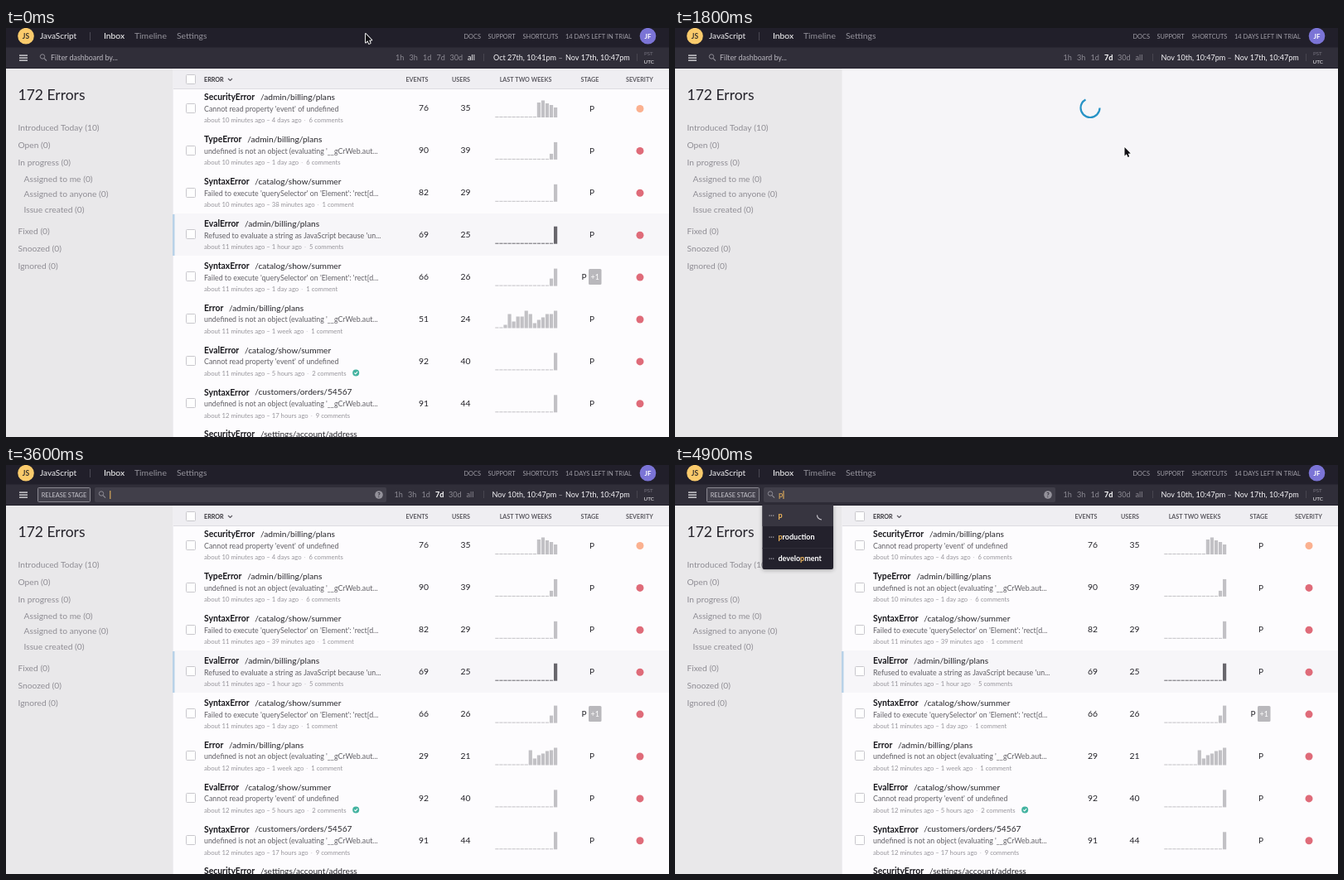
An HTML page with a canvas that plays this animation: 800 px wide and 494 px high, repeating every 5000 ms.

```html
<!DOCTYPE html>
<html lang="en">
<head>
<meta charset="utf-8">
<title>Error inbox</title>
<style>
html, body { margin: 0; width: 100%; height: 100%; overflow: hidden; background: #f6f5f8; }
canvas { display: block; width: 800px; height: 494px; }
</style>
</head>
<body>
<canvas id="stage"></canvas>
<script>
const W = 800, H = 494, LOOP = 5000, STEP = 100;
const FONT = 'Lato, "Open Sans", sans-serif';
const AMBER = '#f2b95c', PANEL = '#23212c', WHITE = '#ffffff';
const ROW_H = 50.9;

const canvas = document.getElementById('stage');
const ctx = canvas.getContext('2d');
const dpr = window.devicePixelRatio || 1;
canvas.width = W * dpr;
canvas.height = H * dpr;

const T = {
  hover: 800, click: 1100, loaded: 1900,
  focus: 2500, r: 2600, re: 2700, rel: 2800,
  pill: 3600, options: 3700, p: 4100, busy: 4500
};

const UNDEF = "undefined is not an object (evaluating '__gCrWeb.aut...";
const EVENT = "Cannot read property 'event' of undefined";
const QUERY = "Failed to execute 'querySelector' on 'Element': 'rect[d...";
const REFUSED = "Refused to evaluate a string as JavaScript because 'un...";

// Minutes hold [before, after] the range change; bars align to the right edge.
const ROWS = [
  { name: 'SecurityError', path: '/admin/billing/plans', msg: EVENT, mins: [10, 10], ago: '4 days', notes: '6 comments', n: [76, 35], bars: [18, 20.5, 17, 15, 12], mild: true },
  { name: 'TypeError', path: '/admin/billing/plans', msg: UNDEF, mins: [10, 10], ago: '1 day', notes: '6 comments', n: [90, 39], bars: [7, 21] },
  { name: 'SyntaxError', path: '/catalog/show/summer', msg: QUERY, mins: [10, 11], ago: '38 minutes', later: '39 minutes', notes: '1 comment', n: [82, 29], bars: [21] },
  { name: 'EvalError', path: '/admin/billing/plans', msg: REFUSED, mins: [11, 11], ago: '1 hour', notes: '5 comments', n: [69, 25], bars: [21], active: true },
  { name: 'SyntaxError', path: '/catalog/show/summer', msg: QUERY, mins: [11, 11], ago: '1 day', notes: '1 comment', n: [66, 26], bars: [9, 21], extra: true },
  { name: 'Error', path: '/admin/billing/plans', msg: UNDEF, mins: [11, 12], ago: '1 week', notes: '1 comment', n: [51, 24], n2: [29, 21],
    bars: [4, 17, 8, 14, 14, 21, 17, 6, 10, 13, 17, 17, 21], bars2: [18, 8, 12, 14, 17, 18, 21] },
  { name: 'EvalError', path: '/catalog/show/summer', msg: EVENT, mins: [11, 12], ago: '5 hours', notes: '2 comments', n: [92, 40], bars: [21], done: true },
  { name: 'SyntaxError', path: '/customers/orders/54567', msg: UNDEF, mins: [12, 12], ago: '17 hours', notes: '9 comments', n: [91, 44], bars: [21] },
  { name: 'SecurityError', path: '/settings/account/address', msg: EVENT, mins: [12, 12], ago: '2 days', notes: '3 comments', n: [64, 31], bars: [21] }
];

const FILTERS = [
  ['user id', 'user impacted by an event'],
  ['user email', 'user impacted by an event'],
  ['user name', 'user impacted by an event'],
  ['release stage', 'production, staging, development, etc.'],
  ['introduced in version', 'app version the error was first seen in'],
  ['seen in version', 'app version the event occurred in'],
  ['introduced in version code', 'version code the error was first seen in'],
  ['seen in version code', 'version code the event occurred in']
];

function box(x, y, w, h, fill) {
  ctx.fillStyle = fill;
  ctx.fillRect(x, y, w, h);
}

function round(x, y, w, h, r, fill, stroke) {
  ctx.beginPath();
  ctx.roundRect(x, y, w, h, r);
  if (fill) { ctx.fillStyle = fill; ctx.fill(); }
  if (stroke) { ctx.strokeStyle = stroke; ctx.lineWidth = 1; ctx.stroke(); }
}

function disc(x, y, r, fill) {
  ctx.beginPath();
  ctx.arc(x, y, r, 0, Math.PI * 2);
  ctx.fillStyle = fill;
  ctx.fill();
}

function line(points, color, width = 1) {
  ctx.beginPath();
  points.forEach(([x, y]) => ctx.lineTo(x, y));
  ctx.strokeStyle = color;
  ctx.lineWidth = width;
  ctx.stroke();
}

function arc(x, y, r, from, to, color, width) {
  ctx.beginPath();
  ctx.arc(x, y, r, from, to);
  ctx.strokeStyle = color;
  ctx.lineWidth = width;
  ctx.stroke();
}

// y is the middle of the capitals; returns the right edge.
function text(s, x, y, size, color, bold = false, align = 'left') {
  ctx.font = (bold ? '700 ' : '400 ') + size + 'px ' + FONT;
  ctx.textAlign = align;
  ctx.fillStyle = color;
  ctx.fillText(s, x, y + size * 0.36);
  return x + ctx.measureText(s).width;
}

// Title with one highlighted part.
function marked(s, part, x, y) {
  const i = part ? s.indexOf(part) : -1;
  if (i < 0) return text(s, x, y, 9, WHITE, true);
  x = text(s.slice(0, i), x, y, 9, WHITE, true);
  x = text(part, x, y, 9, AMBER, true);
  return text(s.slice(i + part.length), x, y, 9, WHITE, true);
}

function topBar() {
  box(0, 0, W, 23, '#211f2a');
  disc(24, 9.7, 9.8, '#fbcb6c');
  text('JS', 24, 10, 8.6, '#3a332c', true, 'center');
  text('JavaScript', 41, 9.5, 10, '#f2f1f4');
  box(101, 5, 1, 10, '#4b4954');
  text('Inbox', 118, 9.5, 10.3, WHITE);
  text('Timeline', 155, 9.5, 10.4, '#94929b');
  text('Settings', 206, 9.5, 10.4, '#94929b');
  text('DOCS', 552.5, 10.5, 7.4, '#a09ea7');
  text('SUPPORT', 581.5, 10.5, 7.4, '#a09ea7');
  text('SHORTCUTS', 623.5, 10.5, 7.4, '#a09ea7');
  text('14 DAYS LEFT IN TRIAL', 675, 10.5, 7.5, '#a09ea7');
  disc(774.5, 9.7, 9.8, '#7b74d6');
  text('JF', 774.5, 10, 8, WHITE, true, 'center');
}

function magnifier(x) {
  arc(x - 1, 34.5, 2.7, 0, Math.PI * 2, '#8d8b94', 1);
  line([[x + 1, 36.7], [x + 4, 39.7]], '#8d8b94', 1.2);
}

function filterBar(t) {
  box(0, 23, W, 26, '#302e39');
  box(0, 23, W, 1, '#282631');
  box(0, 48, W, 1, '#24222d');
  for (const y of [32.5, 35.5, 38.5]) box(16, y, 10, 1.2, '#f4f3f6');

  const picked = t >= T.click;
  const dx = picked ? -1.5 : 0;
  const ranges = [['1h', 470], ['3h', 486.5], ['1d', 503], ['7d', 519.5], ['30d', 535.5], ['all', 557]];
  for (const [label, x] of ranges) {
    const lit = label === '7d' ? t >= T.hover : label === 'all' && !picked;
    text(label, x + dx, 35.5, 9.1, lit ? WHITE : '#8c8a93', lit && label === '7d');
  }
  box(576, 31, 1, 9, '#47454f');
  text(picked ? 'Nov 10th, 10:47pm' : 'Oct 27th, 10:41pm', picked ? 586.5 : 588, 35.5, 9.05, '#f4f3f6');
  text('–', 666.5, 35.5, 9, '#a5a3ab');
  text('Nov 17th, 10:47pm', 675, 35.5, 9.05, '#f4f3f6');
  box(761, 31, 1, 9, '#47454f');
  text('PST', 770, 31, 6.2, '#777580');
  text('UTC', 769.5, 40.5, 6.3, '#f0eff2');

  if (t < T.focus) {
    magnifier(45);
    text('Filter dashboard by...', 54, 35.5, 8.9, '#bab8c0');
    return;
  }
  const pill = t >= T.pill, left = pill ? 107 : 36;
  if (pill) {
    round(38.5, 27.5, 63, 17, 1, '#43414c', '#8b8992');
    text('RELEASE STAGE', 70, 36, 7.4, '#c9c7ce', false, 'center');
  }
  round(left, 27, 459 - left, 18, 2, '#413f4a');
  magnifier(left + 9);
  const typed = pill ? (t >= T.p ? 'p' : '')
    : t >= T.rel ? 'rel' : t >= T.re ? 're' : t >= T.r ? 'r' : '';
  const end = text(typed, left + 18, 35.5, 9.2, AMBER);
  box(end + 0.3, 31, 1, 10, AMBER);
  disc(450, 36, 4.8, '#94929b');
  text('?', 450, 36, 7.5, '#302e39', true, 'center');
}

function sidebar() {
  box(0, 49, 201.5, H - 49, '#e9e8ea');
  box(201, 49, 1, H - 49, '#efeef1');
  text('172 Errors', 14.5, 81, 17.5, '#25232b');
  const items = [
    ['Introduced Today (10)', 120], ['Open (0)', 141], ['In progress (0)', 162],
    ['Assigned to me (0)', 182, 7], ['Assigned to anyone (0)', 200.5, 7], ['Issue created (0)', 219.5, 7],
    ['Fixed (0)', 245], ['Snoozed (0)', 266], ['Ignored (0)', 287]
  ];
  for (const [label, y, indent = 0] of items) text(label, 14.5 + indent, y, 10.25, '#8f8d94');
}

function checkbox(y) {
  round(217.5, y - 5.5, 11, 11, 1, '#fefefe', '#c9c8cd');
}

function spark(bars, y, active) {
  const color = active ? '#69676d' : '#c2c1c5';
  for (let i = 0; i < 15; i++) {
    const h = bars[i - 15 + bars.length] || 1;
    box(590.3 + i * 5.05, y - h, 4.2, h, color);
  }
}

function row(d, i, late) {
  const y = 83.5 + ROW_H * i, top = Math.round(71.3 + ROW_H * i);
  box(202, top, W - 202, 51, d.active ? '#f7f6f9' : '#fdfcfe');
  box(202, top + 51, W - 202, 1, '#edecf0');
  if (d.active) box(201, top + 1, 2.5, 50, '#b8d2e8');
  checkbox(Math.round(y + 13.2));

  const end = text(d.name, 239, y, 10.4, '#19181d', true);
  text(d.path, end + 6.8, y, 10.2, '#28272c');
  text(d.msg, 239, y + 14.3, 8.85, '#626066');
  const ago = late && d.later || d.ago;
  const x = text(`about ${d.mins[late ? 1 : 0]} minutes ago – ${ago} ago`, 239, y + 28, 7.7, '#97959b');
  text('·', x + 3, y + 28, 7.7, '#cfced3');
  const right = text(d.notes, x + 9, y + 28, 7.7, '#97959b');
  if (d.done) {
    const cx = right + 11.5, cy = y + 27.6;
    disc(cx, cy, 4, '#43b3a0');
    line([[cx - 1.8, cy], [cx - 0.4, cy + 1.4], [cx + 2, cy - 1.5]], WHITE, 1.1);
  }

  const [events, users] = late && d.n2 || d.n;
  text(events, 504, y + 13.2, 10.4, '#242329', false, 'center');
  text(users, 554.5, y + 13.2, 10.4, '#242329', false, 'center');
  spark(late && d.bars2 || d.bars, y + 24.5, d.active);
  text('P', d.extra ? 697.5 : 707, y + 13.5, 10, '#242329', false, 'center');
  if (d.extra) {
    round(703, y + 4, 15.5, 19, 1.5, '#b9b8bc');
    text('+1', 710.7, y + 13.5, 9, WHITE, false, 'center');
  }
  disc(765, y + 14, 4.5, d.mild ? '#fbb190' : '#df6b79');
}

function errorList(late) {
  ROWS.forEach((d, i) => row(d, i, late));
  box(202, 49, W - 202, 24, '#efeef2');
  box(202, 73, W - 202, 1, '#dddce1');
  checkbox(62);
  text('ERROR', 239, 62.5, 7.2, '#38363c', true);
  line([[268, 61], [270.5, 63.5], [273, 61]], '#5d5b62', 1.1);
  const heads = [['EVENTS', 496], ['USERS', 549], ['LAST TWO WEEKS', 627], ['STAGE', 704.5], ['SEVERITY', 764.5]];
  for (const [label, x] of heads) text(label, x, 62.5, 7.2, '#5d5b62', true, 'center');
}

function panel(x, w, h) {
  ctx.save();
  ctx.shadowColor = 'rgba(0,0,0,.3)';
  ctx.shadowBlur = 5 * dpr;
  ctx.shadowOffsetY = dpr;
  round(x, 48, w, h, [0, 0, 2, 2], PANEL);
  ctx.restore();
}

function wrench(x, y) {
  line([[x - 2, y + 2.5], [x + 1, y - 0.5]], '#aaa8b0', 1.4);
  arc(x + 1.5, y - 1.2, 1.5, 0, Math.PI * 1.5, '#aaa8b0', 1.1);
}

function filterMenu(t) {
  const narrow = t >= T.rel;
  const list = narrow ? [FILTERS[3]] : FILTERS;
  const pitch = 33.45, h = narrow ? 33 : 265;
  panel(35, 164.5, h);
  list.forEach(([title, hint], i) => {
    const y = 58 + pitch * i;
    if (!i) box(35, 48, 164.5, 33, narrow ? '#2b2934' : '#373540');
    else box(35, y - 10, 164.5, 1, '#302e39');
    wrench(45.5, y + 6.5);
    marked(title, narrow ? 're' : '', 54, y);
    text(hint, 54, y + 13, 7.8, '#92909a');
  });
  if (!narrow) round(194.5, 48, 5, 123, 2, '#6e6c75');
}

function option(label, y, part) {
  for (let i = 0; i < 3; i++) box(113.5 + i * 2.3, y, 1.2, 1.2, '#b5b3bb');
  marked(label, part, 124.5, y);
}

function stageMenu(t) {
  if (t < T.p) {
    panel(105.5, 159, 130);
    box(105.5, 48, 159, 50, '#44424d');
    box(105.5, 98, 159, 26, '#2f2d38');
    text('Filter dashboard by release stage', 113, 59, 9, WHITE, true);
    text('Exact match only', 113, 73, 9, '#d5d3d9');
    text('LEARN MORE', 113, 87.5, 7.4, '#8fc2ea', true);
    ['production', 'staging', 'development'].forEach((s, i) => {
      if (i) box(105.5, 98 + i * 26, 159, 1, '#2e2c37');
      option(s, 111.5 + i * 26);
    });
    return;
  }
  panel(105.5, 85.5, 78);
  box(105.5, 48, 85.5, 26, '#373540');
  box(105.5, 100, 85.5, 1, '#2e2c37');
  ['p', 'production', 'development'].forEach((s, i) => option(s, 60.5 + i * 26, 'p'));
  if (t >= T.busy) {
    const a = (t - 4900) / 800 * Math.PI * 2;
    arc(177, 60.5, 5.5, a + Math.PI * 0.5, a + Math.PI, '#d5d3d9', 1.1);
  }
}

function spinner(t) {
  const a = (t - 1600) / 800 * Math.PI * 2 - Math.PI / 2;
  arc(501, 96.5, 11.5, a, a + Math.PI * 1.34, '#2793c6', 2.2);
}

const ease = u => u * u * (3 - 2 * u);
const part = (t, a, b) => ease(Math.min(1, Math.max(0, (t - a) / (b - a))));

function cursorAt(t) {
  const u = part(t, 0, 800), v = part(t, 1100, 1600);
  return [434 + 90.5 * u + 18 * v, 7 + 30 * u + 107 * v];
}

function arrow(x, y) {
  ctx.beginPath();
  [[0, 0], [0, 10.5], [2.4, 8.3], [4, 12], [5.7, 11.2], [4.2, 7.7], [7.3, 7.6]]
    .forEach(([px, py]) => ctx.lineTo(x + px, y + py));
  ctx.closePath();
  ctx.lineJoin = 'round';
  ctx.strokeStyle = WHITE;
  ctx.lineWidth = 1.8;
  ctx.stroke();
  ctx.fillStyle = '#111015';
  ctx.fill();
}

function hand(x, y) {
  ctx.beginPath();
  [[-1, 0], [1, 0], [1.2, 4], [5.8, 5], [6, 8.5], [4.6, 11], [-1, 11], [-4, 7], [-3.4, 5.8], [-1.1, 7]]
    .forEach(([px, py]) => ctx.lineTo(x + px, y + py));
  ctx.closePath();
  ctx.lineJoin = 'round';
  ctx.strokeStyle = '#16151b';
  ctx.lineWidth = 2;
  ctx.stroke();
  ctx.fillStyle = WHITE;
  ctx.fill();
}

function draw(t) {
  ctx.setTransform(dpr, 0, 0, dpr, 0, 0);
  box(0, 0, W, H, '#f6f5f8');
  sidebar();
  if (t < T.click || t >= T.loaded) errorList(t >= T.loaded);
  else spinner(t);
  filterBar(t);
  topBar();
  if (t >= T.options) stageMenu(t);
  else if (t >= T.focus && t < T.pill) filterMenu(t);
  if (t < T.focus) {
    const [x, y] = cursorAt(t);
    (t >= T.hover && t <= T.click ? hand : arrow)(x, y);
  }
}

const start = performance.now();
function tick() {
  const t = (performance.now() - start) % LOOP;
  draw(Math.floor(t / STEP) * STEP);
  requestAnimationFrame(tick);
}
tick();
</script>
</body>
</html>
```
